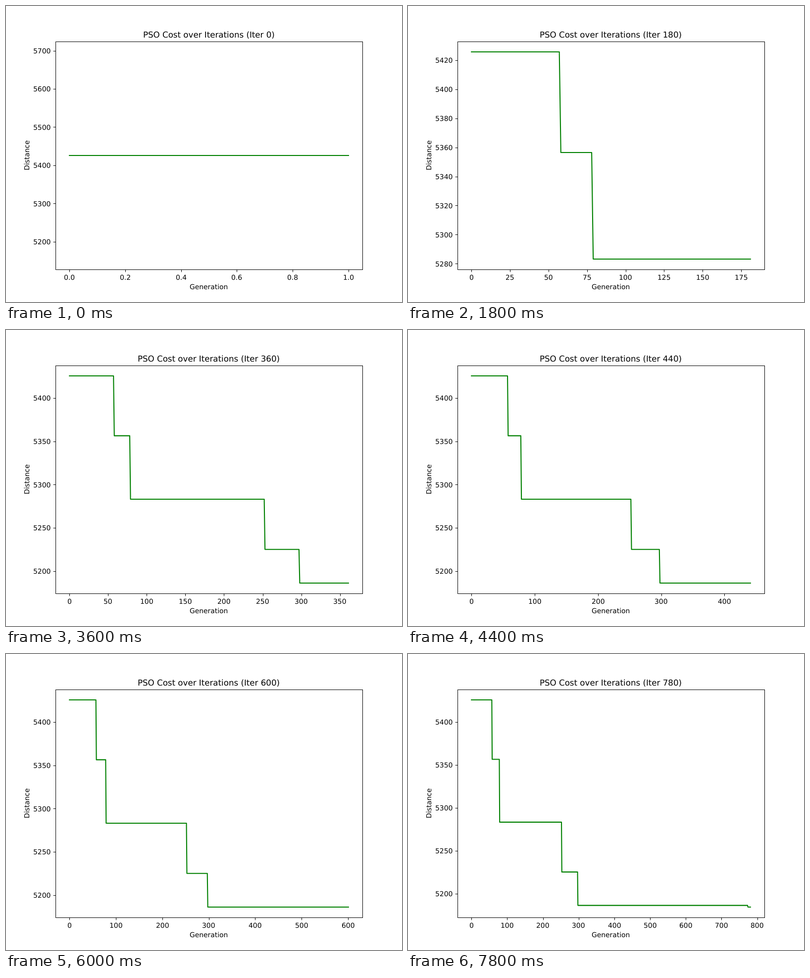
Animation, 800 px wide and 600 px high, one loop 8000 ms. Source, as an HTML page with a canvas:

```html
<!DOCTYPE html>
<html lang="en">
<head>
<meta charset="utf-8">
<title>PSO cost</title>
<style>
  html, body { margin: 0; width: 100%; height: 100%; overflow: hidden; background: #fff; }
  canvas { display: block; }
</style>
</head>
<body>
<canvas id="chart" width="800" height="600"></canvas>
<script>
const ctx = document.getElementById('chart').getContext('2d');
const LOOP = 8000, STEP_MS = 200, ITERS_PER_STEP = 20;
const PT = 100 / 72;
const LEFT = 100, RIGHT = 720, TOP = 72, BOTTOM = 534;
const MID_X = (LEFT + RIGHT) / 2, MID_Y = (TOP + BOTTOM) / 2;
const TICK = 3.5 * PT;

// Best cost so far: [first generation, distance]
const LEVELS = [[0, 5425.7], [58, 5356.45], [79, 5283.15], [253, 5225.1], [298, 5186.15], [774, 5184.2]];

function costLine(last) {
  const points = [];
  LEVELS.forEach(([start, cost], i) => {
    if (start > last) return;
    const next = LEVELS[i + 1];
    const end = next ? Math.min(next[0] - 1, last) : last;
    points.push([start, cost], [end, cost]);
  });
  return points;
}

// View limits with a 5 % margin; a flat range is widened first.
function limits(min, max) {
  if (min === max) {
    const widen = max * 0.05;
    min -= widen;
    max += widen;
  }
  const margin = (max - min) * 0.05;
  return [min - margin, max + margin];
}

function ticks([lo, hi]) {
  const raw = (hi - lo) / 9;
  const unit = 10 ** Math.floor(Math.log10(raw));
  const step = unit * [1, 2, 2.5, 5, 10].find(s => s * unit >= raw);
  const values = [];
  for (let k = Math.ceil(lo / step); k * step <= hi; k++) values.push(k * step);
  return values.map(value => ({ value, label: value.toFixed(step < 1 ? 1 : 0) }));
}

const snap = v => Math.floor(v + 0.5) + 0.5;

function segment(x1, y1, x2, y2) {
  ctx.beginPath();
  ctx.moveTo(x1, y1);
  ctx.lineTo(x2, y2);
  ctx.stroke();
}

// anchor: 0 = left, 0.5 = centre, 1 = right
function text(str, x, baseline, anchor, points = 10) {
  ctx.font = `${points * PT}px "DejaVu Sans", sans-serif`;
  ctx.fillText(str, Math.round(x - ctx.measureText(str).width * anchor), Math.round(baseline));
}

function draw(iter) {
  const last = iter + 1;
  const points = costLine(last);
  const xLim = limits(0, last);
  const yLim = limits(points[points.length - 1][1], points[0][1]);
  const toX = v => LEFT + (v - xLim[0]) / (xLim[1] - xLim[0]) * (RIGHT - LEFT);
  const toY = v => BOTTOM - (v - yLim[0]) / (yLim[1] - yLim[0]) * (BOTTOM - TOP);

  ctx.fillStyle = '#fff';
  ctx.fillRect(0, 0, 800, 600);
  ctx.fillStyle = ctx.strokeStyle = '#000';
  ctx.lineWidth = 1;
  ctx.lineCap = 'butt';

  for (const { value, label } of ticks(xLim)) {
    const x = toX(value);
    segment(snap(x), BOTTOM + 0.5, snap(x), BOTTOM + 0.5 + TICK);
    text(label, x, 555, 0.5);
  }
  for (const { value, label } of ticks(yLim)) {
    const y = toY(value);
    segment(LEFT + 0.5 - TICK, snap(y), LEFT + 0.5, snap(y));
    text(label, LEFT - 7 * PT, y + 5.3, 1);
  }

  const flat = points.length === 2;
  ctx.strokeStyle = '#008000';
  ctx.lineWidth = flat ? 2 : 1.5 * PT;
  ctx.lineCap = 'square';
  ctx.lineJoin = 'round';
  ctx.beginPath();
  for (const [gen, cost] of points) {
    const x = toX(gen), y = toY(cost);
    ctx.lineTo(flat ? Math.round(x) : x, flat ? Math.round(y) : y);
  }
  ctx.stroke();

  ctx.strokeStyle = '#000';
  ctx.lineWidth = 1;
  ctx.lineJoin = 'miter';
  ctx.strokeRect(LEFT + 0.5, TOP + 0.5, RIGHT - LEFT, BOTTOM - TOP);

  text(`PSO Cost over Iterations (Iter ${iter})`, MID_X, TOP - 6 * PT, 0.5, 12);
  text('Generation', MID_X, 574, 0.5);
  ctx.save();
  ctx.translate(47, MID_Y);
  ctx.rotate(-Math.PI / 2);
  text('Distance', 0, 0, 0.5);
  ctx.restore();
}

ctx.textRendering = 'geometricPrecision';
const startTime = performance.now();
function frame() {
  const t = (performance.now() - startTime) % LOOP;
  draw(Math.floor(t / STEP_MS) * ITERS_PER_STEP);
  requestAnimationFrame(frame);
}
frame();
</script>
</body>
</html>
```
